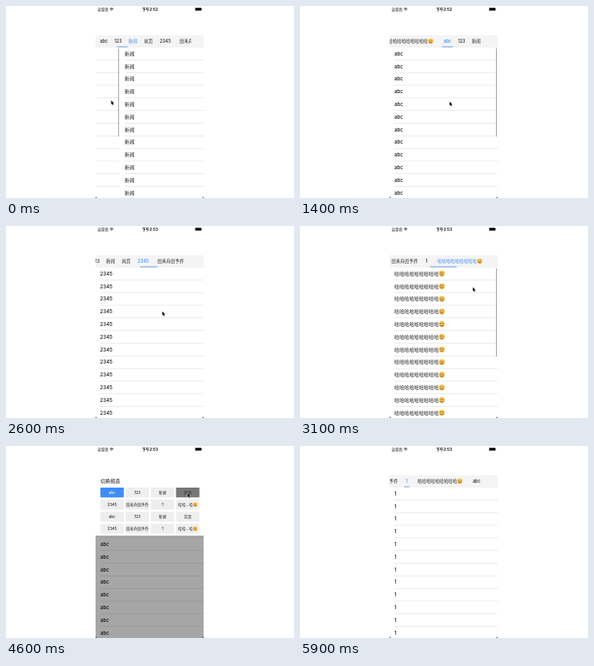
Animation of 360x240 px, one loop 6000 ms. Source, as an HTML page with a canvas:

```html
<!DOCTYPE html>
<html lang="zh-CN">
<head>
<meta charset="utf-8">
<title>切换频道</title>
<style>
html, body { margin: 0; width: 100%; height: 100%; overflow: hidden; background: #fff; }
canvas { display: block; width: 360px; height: 240px; }
</style>
</head>
<body>
<canvas id="stage"></canvas>
<script>
const canvas = document.getElementById('stage');
const ratio = window.devicePixelRatio || 1;
canvas.width = 360 * ratio;
canvas.height = 240 * ratio;
const ctx = canvas.getContext('2d');

const LOOP = 6000, STEP = 100;
const LEFT = 112, WIDTH = 135, RIGHT = LEFT + WIDTH, STRIP_END = 231.5;
const FONT = 'Inter, "Noto Sans CJK SC", "Noto Sans CJK", sans-serif';
const SMILE = '😄';
const BLUE = '#3f8cf7', INK = '#111';
const TAB_SIZE = 5.5, LAG = 75;

const mod = (n, m) => ((n % m) + m) % m;
const mix = (a, b, u) => a + (b - a) * u;
const clamp = u => Math.max(0, Math.min(1, u));
const smooth = u => u * u * (3 - 2 * u);

function textWidth(text, size, weight = 500) {
  ctx.font = `${weight} ${size}px ${FONT}`;
  const plain = text.replace(SMILE, '');
  return ctx.measureText(plain).width + (plain === text ? 0 : size * 1.25);
}

const names = ['abc', '123', '新闻', '岚页', '2345', '田禾舟田予乔', '1', '哈哈哈哈哈哈哈哈哈' + SMILE];
let cycle = 0;
const tabs = names.map(name => {
  const width = textWidth(name, TAB_SIZE);
  const cell = width * 1.2 + 6.3;
  cycle += cell;
  return { name, width, centre: cycle - cell / 2 };
});
const tabAt = k => tabs[mod(k, tabs.length)];
const tabCentre = k => tabAt(k).centre + Math.floor(k / tabs.length) * cycle;
const between = (fn, p) => mix(fn(Math.floor(p)), fn(Math.floor(p) + 1), p - Math.floor(p));

// Runs of swipes, one page per beat; pages count on past the last tab
const runs = [
  { start: -154, from: 1, to: 8, beat: 222 },
  { start: 1430, from: 8, to: 4, beat: 295 },
  { start: 2650, from: 4, to: 9, beat: 150 },
  { start: 3600, from: 9, to: 8, beat: 400 }
];
const runAt = t => runs.filter(r => r.start <= t).pop();

function pageAt(t) {
  if (t >= 5400) return 6;
  if (t >= 4700) return 3;
  const { start, from, to, beat } = runAt(t);
  const u = Math.min(Math.abs(to - from), (t - start) / beat);
  return from + Math.sign(to - from) * (Math.floor(u) + smooth(u % 1));
}

// Straight moves through a few [time, ...values] points
function along(points, t, col = 1) {
  const i = points.findIndex(p => p[0] > t);
  if (i < 0) return points[points.length - 1][col];
  const a = points[i - 1], b = points[i];
  return mix(a[col], b[col], (t - a[0]) / (b[0] - a[0]));
}
const stripPath = [[0, 2.67], [1400, 7.72], [2000, 6.18], [2600, 4], [3100, 6.32], [3500, 9], [4000, 8]];
const cursorPath = [
  [0, 166, 118], [1400, 187, 119.5], [2000, 169, 143],
  [3100, 216, 76.5], [4600, 227, 59], [5300, 194, 72]
];

const stripAt = t => t >= 5400 ? 6.92 : t >= 4700 ? 3 : along(stripPath, t);
const pulse = (t, from, to) => clamp(Math.min(t - from, to - t) / 200);

function rect(x, y, w, h, fill) {
  ctx.fillStyle = fill;
  ctx.fillRect(x, y, w, h);
}

function clipped(x, y, w, h, draw) {
  ctx.save();
  ctx.beginPath();
  ctx.rect(x, y, w, h);
  ctx.clip();
  draw();
  ctx.restore();
}

function smile(x, y, r) {
  const dot = (dx, dy, s, fill, to = Math.PI * 2) => {
    ctx.fillStyle = fill;
    ctx.beginPath();
    ctx.arc(x + dx * r, y + dy * r, s * r, 0, to);
    ctx.fill();
  };
  dot(0, 0, 1, '#f6bd3f');
  dot(-.36, -.25, .15, '#6b431b');
  dot(.36, -.25, .15, '#6b431b');
  dot(0, .1, .55, '#85502a', Math.PI);
  rect(x - r * .42, y + r * .1, r * .84, r * .2, '#fff');
}

// y is the vertical middle of the text
function label(text, x, y, size, fill, align = 'left', weight = 500) {
  const w = textWidth(text, size, weight);
  const x0 = align === 'center' ? x - w / 2 : x;
  ctx.fillStyle = fill;
  ctx.fillText(text.replace(SMILE, ''), x0, y + size * .36);
  if (text.endsWith(SMILE)) smile(x0 + w - size * .6, y, size * .6);
}

function statusBar(t) {
  label('运营商', 114.5, 4, 4.5, INK);
  ctx.strokeStyle = INK;
  ctx.lineWidth = .8;
  for (let r = .6; r < 4; r += 1.3) {
    ctx.beginPath();
    ctx.arc(132, 5.9, r, -Math.PI * .75, -Math.PI * .25);
    ctx.stroke();
  }
  label(t < 2500 ? '下午2:52' : '下午2:53', 180, 4, 4.7, INK, 'center', 700);
  rect(236.5, 2.3, 7.6, 3.4, '#000');
  rect(244.4, 3.3, .7, 1.4, '#000');
}

function underline(shift, t) {
  let k = pageAt(Math.max(0, t - LAG));
  if (t < LAG) k = pageAt(t - LAG);
  // It jumps over the seam of the ring and skips the longest tab
  const last = tabs.length - 1;
  if (mod(k, tabs.length) > last) k = Math.ceil(k);
  if (Math.abs(k - last) < .5) return;
  const w = between(i => tabAt(i).width + 4, k);
  rect(shift + between(tabCentre, k) - w / 2, 50.5, w, 1, '#6a9be6');
}

function strip(t, page) {
  rect(LEFT, 36.5, WIDTH, 15.5, '#f4f4f4');
  const shift = 171.5 - between(tabCentre, stripAt(t));
  clipped(LEFT, 36, STRIP_END - LEFT, 16, () => {
    for (let k = -tabs.length; k < tabs.length * 2; k++) {
      label(tabAt(k).name, shift + tabCentre(k), 44, TAB_SIZE, k === Math.round(page) ? BLUE : '#222', 'center');
    }
    underline(shift, t);
  });
}

function pages(t, page) {
  const run = runAt(t);
  const forward = run.to > run.from;
  clipped(LEFT, 52, WIDTH, 188, () => {
    for (let k = Math.floor(page); k <= Math.floor(page) + 1; k++) {
      const x = LEFT + (k - page) * WIDTH;
      for (let i = 0; i < 12; i++) {
        const y = 59.5 + i * 15.82;
        label(tabAt(k).name, x + 6, y, 6.15, INK);
        rect(x + 6, y + 7.6, WIDTH - 6, .6, '#dedede');
      }
      if (forward) rect(x + WIDTH - 2, 53, 1, 110, 'rgba(40,40,40,.45)');
    }
  });
}

function panel(t, page) {
  const open = pulse(t, 4200, 4900) + pulse(t, 5000, 5500);
  if (!open) return;
  const bottom = 36 + 76 * open;
  const pressed = t === 4600 ? 3 : t === 5300 ? 6 : -1;
  rect(LEFT, bottom, WIDTH, 240 - bottom, `rgba(0,0,0,${.35 * open})`);
  clipped(LEFT, 8, WIDTH, bottom - 8, () => {
    rect(LEFT, 8, WIDTH, 104, '#fff');
    label('切换频道', 118, 44, 6.1, INK);
    for (let i = 0; i < 16; i++) {
      const x = 118 + (i % 4) * 31.5, y = 52 + Math.floor(i / 4) * 15.1;
      const on = i === mod(Math.round(page), tabs.length);
      ctx.fillStyle = i === pressed ? '#777' : on ? BLUE : '#eee';
      ctx.beginPath();
      ctx.roundRect(x, y, 29.3, 12.3, .8);
      ctx.fill();
      const { name } = tabAt(i);
      const short = name.length > 8 ? '哈哈...哈' + SMILE : name;
      label(short, x + 14.65, y + 6.2, 4.7, on ? '#fff' : '#222', 'center');
    }
  });
}

function corners() {
  ctx.fillStyle = '#000';
  for (const [x, d] of [[LEFT, 1], [RIGHT, -1]]) {
    ctx.beginPath();
    ctx.moveTo(x, 237.8);
    ctx.quadraticCurveTo(x, 240, x + 2.2 * d, 240);
    ctx.lineTo(x, 240);
    ctx.fill();
  }
}

function cursor(t, page) {
  if (t > 5500) return;
  const sway = t < 4200 ? 35 * Math.sin(page * Math.PI * 2) : 0;
  ctx.save();
  ctx.translate(along(cursorPath, t) + sway, along(cursorPath, t, 2));
  const arrow = new Path2D('M0 0V5L1.2 4L2 5.9L2.9 5.5L2.1 3.7H3.6Z');
  ctx.strokeStyle = '#fff';
  ctx.lineWidth = .8;
  ctx.stroke(arrow);
  ctx.fillStyle = '#000';
  ctx.fill(arrow);
  ctx.restore();
}

function draw(t) {
  const page = pageAt(t);
  ctx.setTransform(ratio, 0, 0, ratio, 0, 0);
  rect(0, 0, 360, 240, '#fff');
  pages(t, page);
  strip(t, page);
  panel(t, page);
  statusBar(t);
  corners();
  cursor(t, page);
}

const start = performance.now();
function tick() {
  const t = Math.max(0, performance.now() - start) % LOOP;
  draw(Math.floor(t / STEP) * STEP);
  requestAnimationFrame(tick);
}
tick();
</script>
</body>
</html>
```
